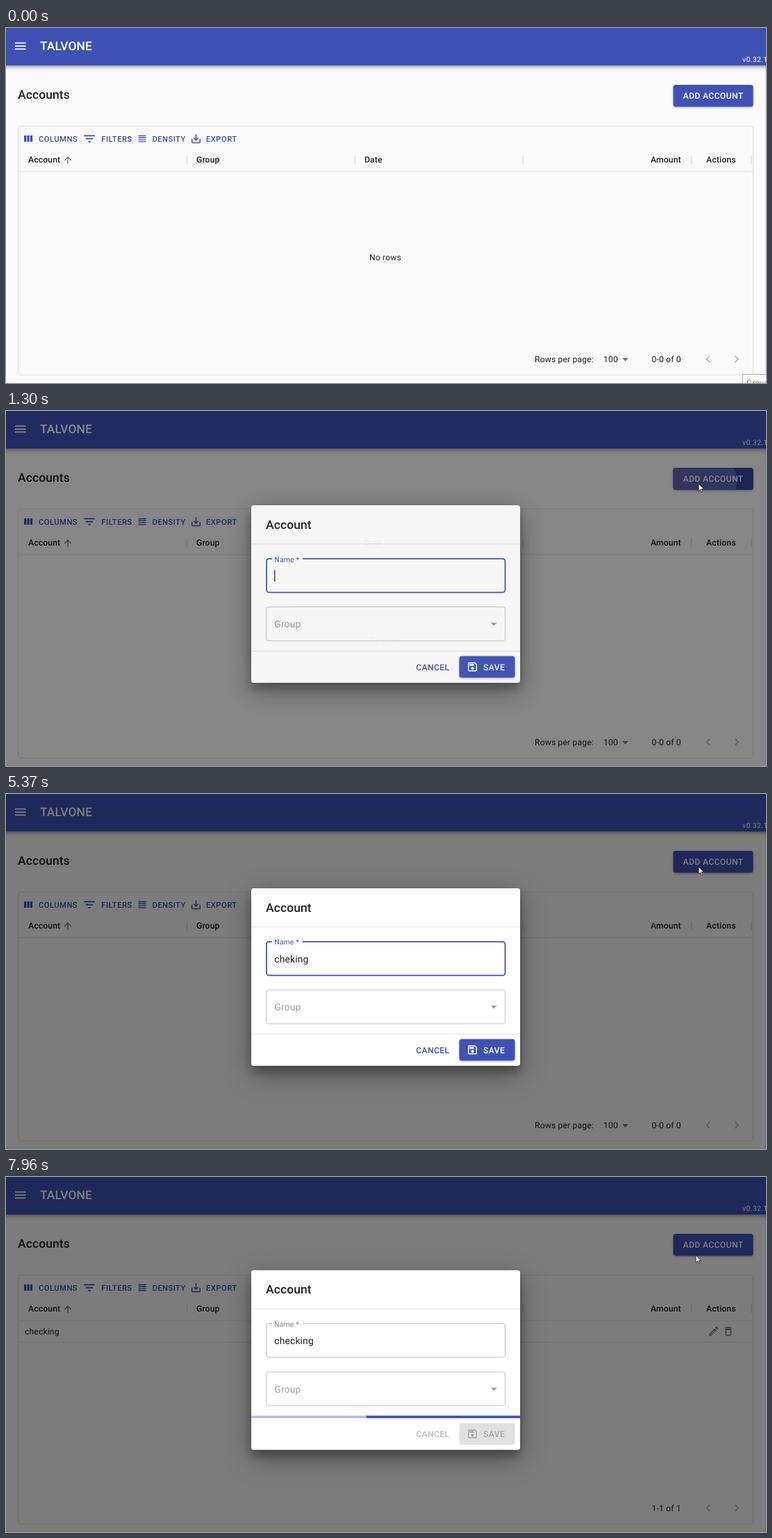
An HTML page that plays this animation: 1094x512 px, repeating every 8 s.

```html
<!DOCTYPE html>
<html lang="en">
<head>
<meta charset="utf-8">
<title>Accounts</title>
<style>
  html, body { margin: 0; width: 100%; height: 100%; overflow: hidden; background: #fafafa; }
  svg { display: block; font: 400 12.18px Roboto, sans-serif; letter-spacing: .0107em; text-rendering: geometricPrecision; }
  text { fill: #000; fill-opacity: .87; white-space: pre; }
  .title { font-size: 17.4px; font-weight: 500; letter-spacing: .0075em; }
  .head { font-weight: 500; }
  .tool text { font-size: 11.3px; font-weight: 500; letter-spacing: .035em; }
  .tool, .tool text, .primary { fill: #3f51b5; fill-opacity: 1; }
  .btn { font-weight: 500; letter-spacing: .0286em; }
  .white, .white text { fill: #fff; fill-opacity: 1; }
  .off, .off text { fill: #000; fill-opacity: .26; }
  .input { font-size: 13.92px; letter-spacing: .0094em; }
  .small { font-size: 10.44px; letter-spacing: .033em; }
  .icon { fill: #000; fill-opacity: .54; }
  .line { fill: none; stroke: #e0e0e0; }
  .outline { fill: none; stroke: #000; stroke-opacity: .23; }
  .bar { filter: drop-shadow(0 2px 2px #0004) drop-shadow(0 1px 4px #0003); }
  .raised { filter: drop-shadow(0 1.5px 1.5px #0005); }
  .paper { filter: drop-shadow(0 9px 7px #0004) drop-shadow(0 10px 18px #0005); }
</style>
</head>
<body>
<svg width="1094" height="512" viewBox="0 0 1094 512">
  <defs>
    <clipPath id="addClip"><rect x="960.5" y="82" width="115" height="31.5" rx="3.5"/></clipPath>
    <clipPath id="saveClip"><rect x="652.5" y="353.5" width="80" height="31" rx="3.5"/></clipPath>
    <clipPath id="barClip"><rect x="353" y="344.3" width="387" height="3.5"/></clipPath>
    <path id="disk" d="M17 3H5c-1.1 0-2 .9-2 2v14c0 1.1.9 2 2 2h14c1.1 0 2-.9 2-2V7zm2 16H5V5h11.2L19 7.8zm-7-7a3 3 0 100 6 3 3 0 000-6zM6 6h9v4H6z" transform="translate(662.8 360.3) scale(.725)"/>
  </defs>

  <rect width="1094" height="512" fill="#fafafa"/>
  <path d="M1093.5 54v458" class="line"/>
  <rect class="bar" x="-20" y="-20" width="1134" height="74" fill="#3f51b5"/>
  <path class="white" d="M3 18h18v-2H3zM3 13h18v-2H3zM3 6v2h18V6z" transform="translate(10.3 15.6) scale(.87)"/>
  <text x="49" y="32" class="title white">TALVONE</text>
  <text x="1060" y="49" class="small white">v0.32.1</text>

  <text x="17" y="101.7" class="title">Accounts</text>
  <g class="raised">
    <rect x="960.5" y="82" width="115" height="31.5" rx="3.5" fill="#3f51b5"/>
    <rect id="addHover" x="960.5" y="82" width="115" height="31.5" rx="3.5" fill="#303f9f"/>
  </g>
  <g clip-path="url(#addClip)"><circle id="addRipple" cx="997" cy="103" fill="#fff"/></g>
  <text x="974.5" y="102" class="btn white">ADD ACCOUNT</text>

  <rect x="17.5" y="141.5" width="1058" height="359" rx="4" class="line"/>
  <g class="tool">
    <path d="M26 155h3.3v9H26zM30.4 155h3.3v9h-3.3zM34.8 155h3.3v9h-3.3z"/>
    <text x="47" y="163.8">COLUMNS</text>
    <path d="M10 18h4v-2h-4zM3 6v2h18V6zM6 13h12v-2H6z" transform="translate(109.6 149.2) scale(.87)"/>
    <text x="137.3" y="163.8">FILTERS</text>
    <path d="M190.5 154.8h11v1.4h-11zM190.5 157.6h11v1.4h-11zM190.5 160.4h11v1.4h-11zM190.5 163.2h11v1.4h-11z"/>
    <text x="210.5" y="163.8">DENSITY</text>
    <path d="M19 12v7H5v-7H3v7c0 1.1.9 2 2 2h14c1.1 0 2-.9 2-2v-7zm-6 .7l2.6-2.6L17 11.5l-5 5-5-5 1.4-1.4 2.6 2.6V3h2z" transform="translate(264.8 151) scale(.725)"/>
    <text x="288" y="163.8">EXPORT</text>
  </g>
  <g class="head">
    <text x="32" y="194">Account</text>
    <text x="274" y="194">Group</text>
    <text x="516" y="194">Date</text>
    <text x="928" y="194">Amount</text>
    <text x="1008" y="194">Actions</text>
  </g>
  <path class="icon" d="M4 12l1.4 1.4L11 7.8V20h2V7.8l5.6 5.6L20 12l-8-8z" transform="translate(81.2 182.7) scale(.65)"/>
  <path d="M260.5 184v12M502.5 184v12M744.5 184v12M986.5 184v12M1073 184v12" class="line" stroke-width="1.7"/>
  <path d="M18 207.2H1075" class="line"/>

  <g id="empty">
    <text x="546" y="335" text-anchor="middle">No rows</text>
    <text x="761" y="482">Rows per page:</text>
    <text x="860" y="481.7">100</text>
    <path class="icon" d="M887 476h9l-4.5 4.5z"/>
  </g>
  <g id="row">
    <text x="27" y="226.8">checking</text>
    <path d="M18 238.2H1075" class="line"/>
    <path class="icon" d="M3 17.2V21h3.8L17.8 9.9l-3.7-3.7zM20.7 7c.4-.4.4-1 0-1.4l-2.3-2.3c-.4-.4-1-.4-1.4 0l-1.8 1.8 3.7 3.7zM6 19H5v-.9l9-9 1 1z" transform="translate(1010 214) scale(.71)"/>
    <path class="icon" fill-rule="evenodd" d="M6 19c0 1.1.9 2 2 2h8c1.1 0 2-.9 2-2V7H6zM8 9h8v10H8zM15.5 4l-1-1h-5l-1 1H5v2h14V4z" transform="translate(1031.3 214) scale(.71)"/>
  </g>
  <text id="range" x="929.5" y="482"></text>
  <g class="off">
    <path d="M15.4 7.4L14 6l-6 6 6 6 1.4-1.4L10.8 12z" transform="translate(1000.3 467.1) scale(.87)"/>
    <path d="M10 6L8.6 7.4l4.6 4.6-4.6 4.6L10 18l6-6z" transform="translate(1041.3 467.1) scale(.87)"/>
  </g>

  <g id="hint">
    <rect x="1060.5" y="499.5" width="60" height="20" fill="#fff" stroke="#aaa"/>
    <text x="1066" y="516" style="fill-opacity:.5">Gravar</text>
  </g>

  <rect id="backdrop" width="1094" height="512"/>

  <g id="dialog">
    <g class="paper"><rect id="paper" x="353" width="387" rx="3.5" fill="#fff"/></g>
    <g id="upper">
      <text x="374" y="169.5" class="title">Account</text>
      <path id="rule" d="M353 191.7H740" class="line"/>
      <path id="field" d="M427 213H715a3.5 3.5 0 013.5 3.5V258a3.5 3.5 0 01-3.5 3.5H378.500a3.500 3.500 0 01-3.500-3.500V216.500a3.500 3.500 0 013.500-3.500H383" fill="none"/>
      <text id="label" class="input">Name *</text>
      <text id="value" x="386.3" y="242.7" class="input"></text>
      <rect id="caret" y="229.500" width="1.1" height="16.500"/>
      <rect x="374.500" y="282.700" width="344" height="48.700" rx="3.500" class="outline"/>
      <text x="386.300" y="312" class="input" style="fill-opacity:.38">Group</text>
      <path d="M697.700 305.200h9.200l-4.600 4.600z" fill-opacity=".38"/>
    </g>
    <path id="footRule" d="M353 346.300H740" class="line"/>
    <g id="progress" clip-path="url(#barClip)">
      <rect x="353" y="344" width="387" height="4" fill="#b5bce2"/>
      <rect id="runner" y="344" height="4" fill="#3f51b5"/>
    </g>
    <g id="lower">
      <g id="active">
        <text x="590.300" y="373.500" class="btn primary">CANCEL</text>
        <g class="raised">
          <rect x="652.500" y="353.500" width="80" height="31" rx="3.500" fill="#3f51b5"/>
          <rect id="saveHover" x="652.500" y="353.500" width="80" height="31" rx="3.500" fill="#303f9f"/>
        </g>
        <g clip-path="url(#saveClip)"><circle id="saveRipple" cx="700" cy="368" fill="#fff"/></g>
        <g class="white"><use href="#disk"/><text x="687" y="373.500" class="btn">SAVE</text></g>
      </g>
      <g id="disabled" class="off">
        <rect x="652.500" y="353.500" width="80" height="31" rx="3.500" fill-opacity=".12"/>
        <text x="590.300" y="373.500" class="btn">CANCEL</text>
        <use href="#disk"/><text x="687" y="373.500" class="btn">SAVE</text>
      </g>
    </g>
  </g>

  <path id="cursor" d="M0 0v10.200l2.400-2.100 1.600 3.600 1.500-.700-1.500-3.400h3.200z" fill="#fff" stroke="#222" stroke-width=".8"/>
</svg>

<script>
const LOOP = 8000, OPEN = 1145, SAVE = 7155, LOADED = 7330;
const ui = {};
document.querySelectorAll('[id]').forEach(el => ui[el.id] = el);

const set = (el, attrs) => { for (const k in attrs) el.setAttribute(k, attrs[k]); };
const show = (el, on) => set(el, { visibility: on ? 'visible' : 'hidden' });
const clamp = v => Math.min(1, Math.max(0, v));

// CSS-style cubic bezier, solved by bisection.
function bezier(x1, y1, x2, y2) {
  const at = (a, b, s) => 3 * a * s * (1 - s) ** 2 + 3 * b * s * s * (1 - s) + s ** 3;
  return x => {
    let lo = 0, hi = 1;
    for (let i = 0; i < 24; i++) {
      const mid = (lo + hi) / 2;
      if (at(x1, x2, mid) < x) lo = mid; else hi = mid;
    }
    return at(y1, y2, lo);
  };
}
const standard = bezier(.4, 0, .2, 1);
const decelerate = bezier(0, 0, .2, 1);
const linearBar = bezier(.65, .815, .735, .395);
const ramp = (t, start, duration, ease = standard) => ease(clamp((t - start) / duration));

// Typing: time, value, caret index
const typing = [
  [0, '', 0], [1190, '', 0], [2180, 'c', 1], [2250, 'ch', 2], [2520, 'che', 3], [2720, 'chek', 4],
  [2850, 'cheki', 5], [3130, 'chekin', 6], [3260, 'cheking', 7], [4250, 'cheking', 0],
  [4450, 'cheking', 1], [4640, 'cheking', 2], [4840, 'cheking', 3], [5570, 'checking', 4]
];

// Pointer: time, x, y
const pointer = [
  [0, 1100, 500], [70, 1090, 480], [450, 1050, 300], [830, 1003, 118], [1000, 997, 105],
  [5700, 997, 105], [5860, 1011, 113], [6500, 716, 366], [6750, 725, 336], [6950, 700, 367],
  [7200, 700, 367], [7420, 742, 328], [7920, 993, 113], [LOOP, 993, 113]
];

function pointerAt(t) {
  const i = pointer.findIndex(p => p[0] > t);
  const [t0, x0, y0] = pointer[i - 1], [t1, x1, y1] = pointer[i];
  const k = (t - t0) / (t1 - t0), e = k * k * (3 - 2 * k);
  return [x0 + (x1 - x0) * e, y0 + (y1 - y0) * e];
}

function ripple(el, t, start, fadeStart, radius) {
  set(el, {
    r: radius * ramp(t, start, 550),
    opacity: .3 * (1 - ramp(t, fadeStart, 500))
  });
}

function drawInput(t, saving) {
  const [time, value, index] = typing.findLast(step => step[0] <= t);
  if (ui.value.textContent !== value) ui.value.textContent = value;
  const offset = index ? ui.value.getSubStringLength(0, index) : 0;
  set(ui.caret, { x: 386.3 + offset });
  const blinkOn = time === 0 || (t - time) % 1060 < 530;
  ui.caret.style.display = blinkOn && !saving ? '' : 'none';

  const lift = ramp(t, OPEN, 200, decelerate);
  set(ui.label, { transform: `translate(386.3 ${242 - 25 * lift}) scale(${1 - .25 * lift})` });
  ui.label.style.fill = saving ? '#000' : '#3f51b5';
  ui.label.style.fillOpacity = saving ? .5 : 1;
  set(ui.field, saving
    ? { stroke: '#000', 'stroke-opacity': .26, 'stroke-width': 1 }
    : { stroke: '#3f51b5', 'stroke-opacity': 1, 'stroke-width': 1.75 });
}

function drawDialog(t) {
  const saving = t >= SAVE, grow = saving ? 1.5 : 0;
  const opacity = ramp(t, OPEN, 225);
  set(ui.backdrop, { opacity: opacity / 2 });
  set(ui.dialog, { opacity });
  set(ui.paper, { y: 136 - grow, height: 256 + 2 * grow });
  set(ui.upper, { transform: `translate(0 ${-grow})` });
  set(ui.lower, { transform: `translate(0 ${grow})` });
  show(ui.footRule, !saving);
  show(ui.progress, saving);

  const run = ramp(t, SAVE, 1260, linearBar);
  const left = -.35 + 1.35 * run, right = 1.9 * run;
  set(ui.runner, { x: 353 + 387 * left, width: 387 * Math.max(0, right - left) });

  const fade = ramp(t, SAVE, 215);
  set(ui.active, { opacity: 1 - fade });
  set(ui.disabled, { opacity: fade });
  set(ui.saveHover, { opacity: ramp(t, 6400, 250) });
  ripple(ui.saveRipple, t, 7070, SAVE, 56);
  drawInput(t, saving);
}

function draw(t) {
  show(ui.hint, t < 70);
  set(ui.addHover, { opacity: ramp(t, 870, 250) - ramp(t, 1250, 250) });
  ripple(ui.addRipple, t, 1065, 1150, 82);
  show(ui.empty, t < LOADED);
  show(ui.row, t >= LOADED);
  ui.range.textContent = t < LOADED ? '0-0 of 0' : '1-1 of 1';
  drawDialog(t);
  set(ui.cursor, { transform: `translate(${pointerAt(t)})` });
}

function tick() {
  draw(performance.now() % LOOP);
  requestAnimationFrame(tick);
}
tick();
</script>
</body>
</html>
```
